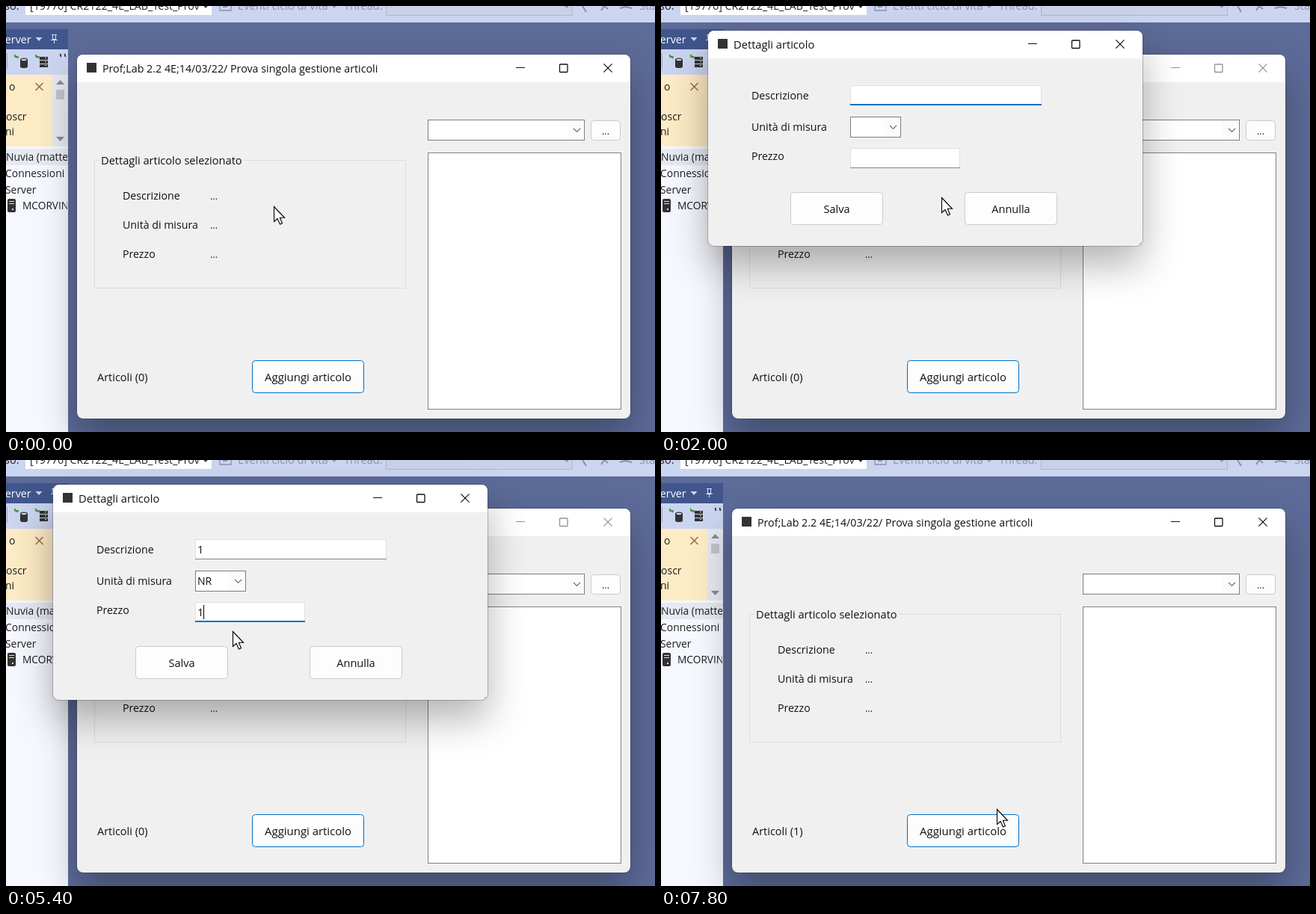
Write an HTML page with a canvas that moves like this. It is 868x570 px and loops after 8 s.

```html
<!DOCTYPE html>
<html lang="it">
<head>
<meta charset="utf-8">
<title>Gestione articoli</title>
<style>
html, body { margin: 0; width: 100%; height: 100%; overflow: hidden; background: #5d6b99; }
canvas { display: block; }
</style>
</head>
<body>
<canvas id="stage" width="868" height="570"></canvas>
<script>
const ctx = document.getElementById('stage').getContext('2d');
const LOOP = 8000, STEP = 200;
const BLUE = '#0070c4', INK = '#111';

// Pointer path: [step, x, y]
const PATH = [
  [0, 358, 268], [1, 372, 261], [2, 430, 275], [3, 505, 350], [4, 513, 420], [5, 450, 490],
  [6, 425, 500], [8, 425, 500], [10, 375, 256], [12, 375, 256], [13, 360, 240],
  [14, 318, 180], [15, 308, 163], [16, 308, 163], [17, 298, 190], [20, 298, 191],
  [22, 298, 207], [25, 298, 208], [26, 302, 222], [27, 303, 229], [28, 285, 255],
  [29, 260, 271], [32, 260, 271], [35, 409, 298], [36, 430, 365], [37, 442, 425],
  [38, 447, 456], [39, 449, 467]
];
const CLICKS = [[6, 426, 501], [15, 309, 163], [18, 299, 191], [23, 299, 208], [30, 257, 272]];
const RIPPLE = [[8, 0.85, '#f04a32'], [18, 0.5, '#ff3c3c'], [24, 0.13, '#ff5050']];

function rect(x, y, w, h, color) {
  ctx.fillStyle = color;
  ctx.fillRect(x, y, w, h);
}

function frame(x, y, w, h, fill, border) {
  rect(x, y, w, h, border);
  rect(x + 1, y + 1, w - 2, h - 2, fill);
}

function round(x, y, w, h, r) {
  ctx.beginPath();
  ctx.roundRect(x, y, w, h, r);
}

function poly(points, fill) {
  ctx.beginPath();
  points.forEach(([x, y]) => ctx.lineTo(x, y));
  ctx.closePath();
  ctx.fillStyle = fill;
  ctx.fill();
}

function line(points, color, width = 1) {
  ctx.beginPath();
  points.forEach(([x, y], i) => i ? ctx.lineTo(x, y) : ctx.moveTo(x, y));
  ctx.strokeStyle = color;
  ctx.lineWidth = width;
  ctx.stroke();
}

function text(s, x, y, color = INK, size = 14.5, align = 'left') {
  ctx.font = `${size}px "Open Sans", "Noto Sans", sans-serif`;
  ctx.textAlign = align;
  ctx.fillStyle = color;
  ctx.fillText(s, x, y);
}

function clipped(x, y, w, h, draw) {
  ctx.save();
  ctx.beginPath();
  ctx.rect(x, y, w, h);
  ctx.clip();
  draw();
  ctx.restore();
}

function cross(x, y, r, color, width = 1.2) {
  line([[x - r, y - r], [x + r, y + r]], color, width);
  line([[x + r, y - r], [x - r, y + r]], color, width);
}

function triangle(x, y, w, h, color) {
  poly([[x - w, y], [x + w, y], [x, y + h]], color);
}

function chevron(x, y) {
  line([[x - 4.5, y - 2.2], [x, y + 2.3], [x + 4.5, y - 2.2]], '#555', 1.1);
}

function button(label, x, y, w, h, mode = 'normal', size) {
  const looks = {
    normal: ['#fdfdfd', '#cbcbcb'],
    focus: ['#fdfdfd', BLUE],
    hover: ['#e0eef9', BLUE],
    pressed: ['#f4f4f4', '#e2e2e2']
  };
  const [fill, border] = looks[mode];
  round(x + 0.5, y + 0.5, w - 1, h - 1, 4);
  ctx.fillStyle = fill;
  ctx.fill();
  ctx.strokeStyle = border;
  ctx.lineWidth = 1;
  ctx.stroke();
  text(label, x + w / 2, y + h / 2 + 5.5, INK, size, 'center');
}

function combo(x, y, w, h, open) {
  frame(x, y, w, h, '#fff', open ? BLUE : '#7c7c7c');
  if (open) frame(x + w - 21, y, 21, h, '#e3f0fb', BLUE);
  else rect(x + w - 23, y + 2, 21, h - 4, '#fbfbfb');
  chevron(x + w - 10.5, y + h / 2);
}

function field(x, y, w, h, focus) {
  frame(x, y, w, h, '#fff', '#dfdfdf');
  if (focus) rect(x, y + h - 2, w, 2, BLUE);
  else rect(x, y + h - 1, w, 1, '#868686');
}

function windowBox(x, y, w, h, title, size, active) {
  ctx.save();
  ctx.shadowColor = 'rgba(0,0,0,.3)';
  ctx.shadowBlur = 52;
  ctx.shadowOffsetY = 25;
  round(x, y, w, h, 8);
  ctx.fillStyle = '#f0f0f0';
  ctx.fill();
  ctx.restore();

  ctx.save();
  round(x, y, w, h, 8);
  ctx.clip();
  rect(x, y, w, 37, '#fff');
  ctx.restore();
  round(x - 0.5, y - 0.5, w + 1, h + 1, 8.5);
  ctx.strokeStyle = 'rgba(40,40,60,.28)';
  ctx.lineWidth = 1;
  ctx.stroke();

  const ink = active ? INK : '#929292';
  const right = x + w;
  rect(x + 13, y + 11, 13, 13, '#333');
  text(title, x + 34, y + 24, ink, size);
  rect(right - 153, y + 17, 12, 1, ink);
  round(right - 94.5, y + 13, 10.5, 10.5, 1);
  ctx.strokeStyle = ink;
  ctx.lineWidth = 1.3;
  ctx.stroke();
  cross(right - 30, y + 18, 5.6, ink);
}

function topBar() {
  const dim = '#8b91a8';
  rect(0, 0, 868, 22, '#ccd5f0');
  text('so:', -2, 5, '#222');
  rect(26, 0, 249, 12, '#fff');
  clipped(26, 0, 232, 12, () => text('[19776] CR2122_4E_LAB_Test_Prova', 32, 5, '#222', 14.2));
  triangle(267, -1, 3.5, 4, '#333');
  line([[286, 0], [286, 6], [301, 6], [301, 0]], dim, 1.3);
  line([[290, 1], [296, 1]], dim, 2);
  text('Eventi ciclo di vita', 310, 5, dim, 14.7);
  triangle(439, -1, 3.5, 4, dim);
  text('Thread:', 452, 5, dim);
  frame(508, -2, 250, 15, '#c9d1e9', '#aeb6cf');
  triangle(750, -1, 3.5, 4, dim);
  line([[771, 0], [776, 8]], dim, 2);
  line([[796, 6], [800, 0], [805, 4]], dim, 2);
  line([[821, 3], [828, 1], [837, 3]], dim, 2);
  text('Sta', 847, 5, dim);
}

function plug(x, y) {
  line([[x, y], [x + 5, y + 5]], '#388a34', 1.5);
  line([[x, y + 3], [x + 6, y + 3]], '#388a34', 1.5);
}

function sidePanel() {
  const ink = '#1e1e1e';
  rect(0, 31, 83, 539, '#f6f8ff');
  rect(0, 31, 83, 27, '#40568d');
  text('server', -8, 50, '#fff', 14.3);
  triangle(44, 42, 4.5, 5, '#cdd6ee');
  line([[61, 38.5], [68, 38.5]], '#d8dff2');
  ctx.strokeRect(62.5, 38.5, 4, 6);
  line([[60, 45.5], [69, 45.5]], '#d8dff2');
  line([[64.5, 45], [64.5, 50]], '#d8dff2');

  rect(0, 58, 83, 34, '#ccd5f0');
  rect(1, 63, 1, 21, '#9aa5c8');
  plug(11, 65);
  rect(19, 72, 10, 9, '#333');
  ctx.beginPath();
  ctx.ellipse(24, 72, 5, 2.5, 0, 0, 7);
  ctx.ellipse(24, 81, 5, 2, 0, 0, 7);
  ctx.fill();
  ctx.beginPath();
  ctx.ellipse(24, 72, 3.5, 1.2, 0, 0, 7);
  ctx.fillStyle = '#ccd5f0';
  ctx.fill();
  plug(39, 65);
  for (let i = 0; i < 3; i++) {
    rect(45, 68 + i * 5, 11, 4, '#333');
    rect(52, 69 + i * 5, 2, 1, '#dde');
  }
  line([[72.5, 64], [73.5, 68]], ink, 1.5);
  line([[78.5, 64], [79.5, 68]], ink, 1.5);

  rect(0, 92, 62, 96, '#fdebc6');
  text('o', 4, 113, ink, 14);
  cross(44.5, 108, 5, '#9a7338', 1.6);
  text('oscr', 0, 153, ink, 14);
  text('ni', -1, 173, ink, 14);
  rect(62, 92, 21, 96, '#e6e8f0');
  triangle(72.5, 105, 5.5, -6, '#868999');
  rect(67, 112, 11, 13, '#c2c3c9');
  triangle(72.5, 175, 5.5, 6, '#868999');

  rect(0, 191, 83, 22, '#e6e9f1');
  clipped(0, 188, 82, 100, () => {
    text('Nuvia (matteo', 0, 207, ink, 13.9);
    text('Connessioni', -1, 229, ink, 13.9);
    text('Server', -1, 251, ink, 13.9);
    text('MCORVINI', 22, 272, ink, 13.7);
  });
  round(2, 258, 11, 18, 2);
  ctx.fillStyle = '#333';
  ctx.fill();
  rect(4, 261, 7, 1, '#ddd');
  rect(4, 264, 7, 1, '#ddd');
  rect(8, 271, 2, 2, '#ddd');
}

function mainWindow(step, dialogOpen) {
  windowBox(95, 65, 740, 487, 'Prof;Lab 2.2 4E;14/03/22/ Prova singola gestione articoli', 14.25, !dialogOpen);
  combo(564, 152, 210, 28, false);
  button('...', 782, 153, 40, 27, 'normal', 12.5);
  frame(564, 196, 259, 344, '#fff', '#7f828a');

  frame(118, 206, 417, 172, '#f0f0f0', '#dcdcdc');
  rect(125, 204, 194, 5, '#f0f0f0');
  text('Dettagli articolo selezionato', 127, 212, INK, 14.6);
  ['Descrizione', 'Unità di misura', 'Prezzo'].forEach((label, i) => {
    text(label, 156, 259 + i * 39, INK, 14.2);
    text('...', 273, 259 + i * 39, INK, 12.5);
  });
  text(`Articoli (${step < 31 ? 0 : 1})`, 122, 502);
  const mode = step === 6 ? 'pressed' : step === 5 || step === 7 ? 'hover' : 'focus';
  button('Aggiungi articolo', 329, 474, 150, 44, mode, 14.9);
}

function dropList() {
  rect(256, 179, 67, 81, 'rgba(0,0,0,.45)');
  frame(253, 176, 68, 82, '#fff', '#222');
  rect(254, 177, 66, 20, '#0078d7');
  ['NR', 'KG', 'Q', 'T'].forEach((unit, i) => text(unit, 256, 193 + i * 20, i ? INK : '#fff', 14));
}

function dialog(step) {
  windowBox(63, 33, 581, 288, 'Dettagli articolo', 14.7, true);
  text('Descrizione', 121, 125, INK, 14.2);
  text('Unità di misura', 121, 167, INK, 14.2);
  text('Prezzo', 121, 206, INK, 14.2);

  field(253, 106, 256, 27, step < 15);
  if (step >= 12) text('1', 256, 125);
  if (step >= 12 && step < 15) rect(264, 110, 1, 19, '#000');

  field(253, 190, 147, 27, step >= 23 && step < 30);
  if (step >= 26) text('1', 256, 209);
  if (step >= 23 && step < 30) rect(step >= 26 ? 264 : 256, 194, 1, 19, '#000');

  const open = step >= 16 && step <= 18;
  const picked = step >= 19 && step < 23;
  combo(253, 148, 68, 28, open);
  if (picked) rect(256, 152, 21, 20, '#0078d7');
  if (step >= 19) text('NR', 256, 167, picked ? '#fff' : INK, 14);
  if (open) rect(256, 152, 1, 19, '#000');

  const mode = step === 30 ? 'pressed' : step >= 28 ? 'hover' : 'normal';
  button('Salva', 173, 249, 124, 44, mode);
  button('Annulla', 406, 249, 124, 44);
  rect(640, 317, 2, 2, '#bbb');
  if (open) dropList();
}

function ripple(step) {
  CLICKS.forEach(([start, x, y]) => {
    const look = RIPPLE[step - start];
    if (!look) return;
    ctx.globalAlpha = look[1];
    ctx.beginPath();
    ctx.arc(x, y, look[0], 0, Math.PI * 2);
    ctx.fillStyle = look[2];
    ctx.fill();
    ctx.globalAlpha = 1;
  });
}

function pointerAt(step) {
  const i = PATH.findIndex(p => p[0] >= step);
  const b = PATH[i], a = PATH[Math.max(0, i - 1)];
  const k = b[0] === a[0] ? 0 : (step - a[0]) / (b[0] - a[0]);
  return [1, 2].map(n => Math.round(a[n] + (b[n] - a[n]) * k));
}

function pointer(step) {
  const [x, y] = pointerAt(step);
  if (step >= 21 && step <= 25) {
    line([[x + 0.5, y - 9], [x + 0.5, y + 9]], '#000');
    line([[x - 3, y - 9.5], [x + 4, y - 9.5]], '#000');
    line([[x - 3, y + 9.5], [x + 4, y + 9.5]], '#000');
    return;
  }
  const arrow = [[0, 0], [0, 20], [4.5, 16], [8, 23.5], [11, 22.2], [7.8, 14.8], [14, 14.8]];
  poly(arrow.map(([dx, dy]) => [x + 0.5 + dx, y + 0.5 + dy]), '#fff');
  ctx.strokeStyle = '#000';
  ctx.lineWidth = 1.1;
  ctx.stroke();
}

function render(now) {
  const step = Math.floor((now % LOOP) / STEP);
  const dialogOpen = step >= 8 && step < 31;
  rect(0, 0, 868, 570, '#5d6b99');
  topBar();
  sidePanel();
  mainWindow(step, dialogOpen);
  if (dialogOpen) dialog(step);
  ripple(step);
  pointer(step);
  requestAnimationFrame(render);
}
requestAnimationFrame(render);
</script>
</body>
</html>
```
